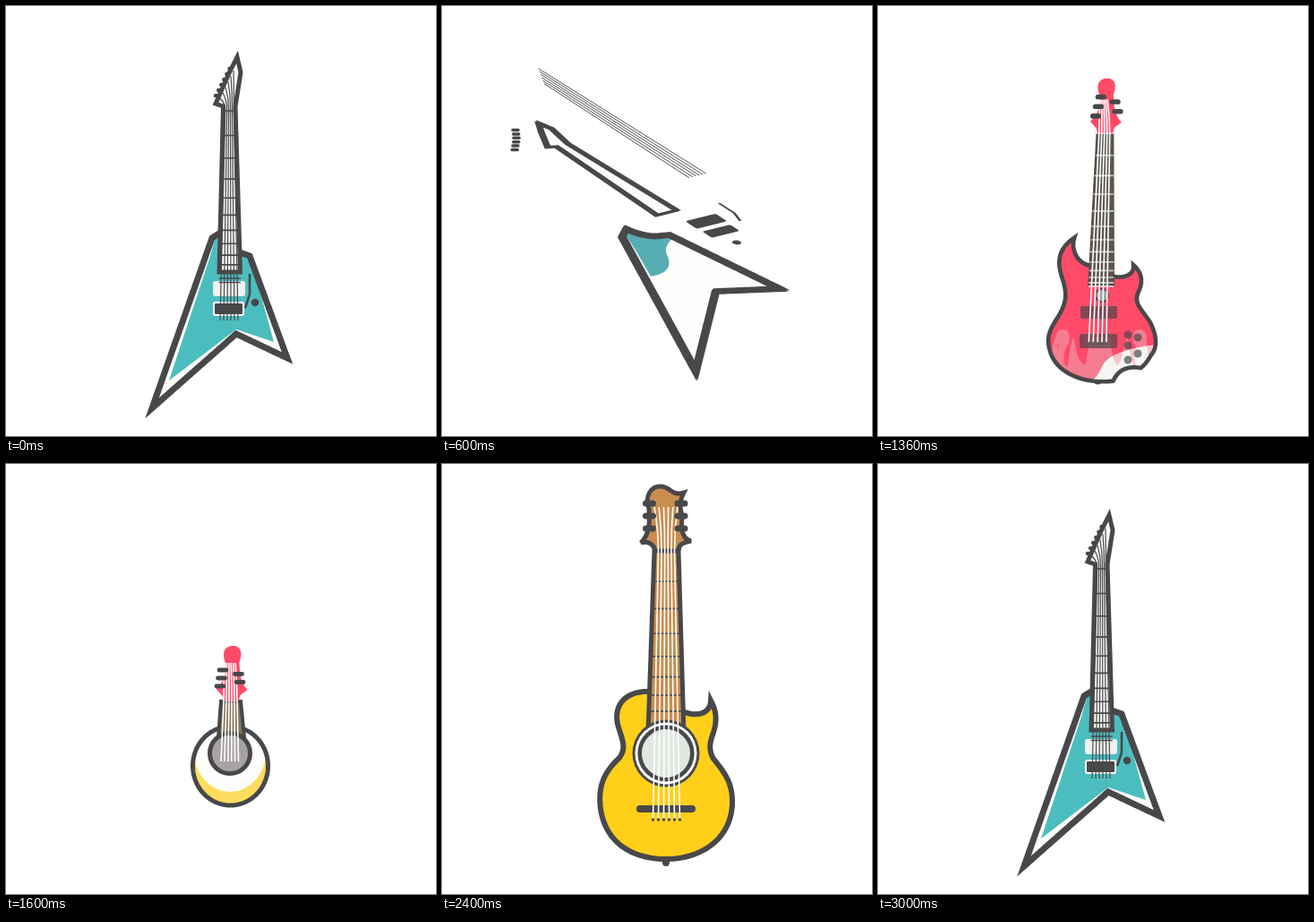
Animation of 480x480 px, one loop 3280 ms. Source, as an HTML page:

```html
<!DOCTYPE html>
<html lang="en">
<head>
<meta charset="utf-8">
<title>Morphing guitars</title>
<style>
html, body { margin: 0; width: 100%; height: 100%; overflow: hidden; background: #fff; }
svg { display: block; width: 100vw; height: 100vh; }
</style>
</head>
<body>
<svg id="stage" viewBox="0 0 480 480"></svg>
<script>
const NS = 'http://www.w3.org/2000/svg';
const stage = document.getElementById('stage');
const DARK = '#48484a', PALE = '#e3eae4', RED = '#ff4a68', YELLOW = '#ffcf1a', WOOD = '#c98d4f', BLANK = '#fdfdfb';
const LOOP = 3280, STEP = 40, END = 3000;

// Blends numbers, arrays and objects alike.
function mix(a, b, u) {
  if (Array.isArray(a)) return a.map((v, i) => mix(v, b[i], u));
  if (typeof a === 'object') return Object.fromEntries(Object.keys(a).map(k => [k, mix(a[k], b[k], u)]));
  return a + (b - a) * u;
}

// Eased value at time t from [time, value] keys.
function at(t, keys) {
  const i = keys.findIndex(k => k[0] > t);
  if (i < 0) return keys[keys.length - 1][1];
  if (!i) return keys[0][1];
  const [t0, a] = keys[i - 1], [t1, b] = keys[i], u = (t - t0) / (t1 - t0);
  return mix(a, b, u * u * (3 - 2 * u));
}

// Evenly spaced outline points, snapped to the path's own corners.
function outline(d, n = 180) {
  const path = document.createElementNS(NS, 'path');
  path.setAttribute('d', d);
  const len = path.getTotalLength();
  const pts = Array.from({ length: n }, (_, i) => {
    const p = path.getPointAtLength(len * i / n);
    return [p.x, p.y];
  });
  for (const seg of d.match(/[MLCA][^MLCAZ]+/g)) {
    const c = seg.match(/[\d.]+/g).slice(-2).map(Number);
    const far = p => Math.hypot(p[0] - c[0], p[1] - c[1]);
    let best = 0;
    pts.forEach((p, i) => { if (far(p) < far(pts[best])) best = i; });
    pts[best] = c;
  }
  return pts;
}

// Six tuning pegs as [x, y, length, thickness], usually in two columns.
const six = f => Array.from({ length: 6 }, (_, i) => f(i));
const columns = (left, right, top, gap, lean, len, w, stagger = 0) => six(i => {
  const row = i >> 1, side = i % 2;
  return [side ? right + lean * row : left - lean * row, top + gap * row + stagger * side, len, w];
});
const loosePegs = six(i => [82 + Math.sin(i * .8), 138.5 + 4.4 * i, 6, 3.5]);

// neck: top left x, y, top right x, bottom left x, y, bottom right x
// strings: first x, gap, y at head, nut and bridge; frets: start, span, overhang, opacity
const vee = {
  body: outline('M241 252L230 259L163 449L257 366L314 393L272 279L261 275C252 271 245 262 241 252Z'), rim: 7,
  neck: [242.5, 112, 256, 238, 297, 261.5], edge: 5, wood: [244, 244, 240],
  strings: [[239, 3, 103], [244.8, 1.9, 115], [239, 4, 351]], rake: -6.2, bulge: 0, ink: 74,
  frets: [117, 190, 0, 1], hole: [0, 0], tone: [223, 232, 225], blank: [110, 140], pin: [245, 330],
  pegs: six(i => [250 - 3.1 * i, 70 + 6 * i, 1, 4.5]), w: { vee: 1, bass: 0, folk: 0, oct: 0 }
};
const bass = {
  body: outline('M237 289C214 288 206 262 217 238C193 254 194 272 203 292C214 316 211 328 197 345C182 362 174 372 178 392C183 424 222 440 262 437C266 420 282 414 299 421C305 417 309 411 313 404C323 394 321 376 308 358C296 343 282 335 291 320C302 304 299 291 288 282C292 296 282 308 262 305Z'), rim: 4.5,
  neck: [246, 86, 263, 234, 315, 262], edge: 0, wood: [72, 72, 74],
  strings: [[250, 1.8, 50], [248.5, 3, 86], [233, 5.4, 397]], rake: 0, bulge: 0, ink: 255,
  frets: [85.5, 229, 0, 1], hole: [0, 0], tone: [168, 162, 164], blank: [44, 54], pin: [243, 441],
  pegs: columns(252, 267, 42, 11.5, 3.5, 6, 6, 6), w: { vee: 0, bass: 1, folk: 0, oct: 0 }
};
const round = {
  body: outline('M250.5 293A42 44 0 0 0 250.5 381A42 44 0 0 0 250.5 293Z'), rim: 5,
  neck: [240, 265, 262, 237, 305, 266], edge: 4, wood: [138, 115, 88],
  strings: [[244, 2.4, 222], [243, 3, 265], [240, 3.9, 332]], rake: 0, bulge: 0, ink: 255,
  frets: [265, 40, 0, 0], hole: [22.5, 5], tone: [168, 162, 164], blank: [40, 44], pin: [250, 370],
  pegs: columns(242, 259.5, 230, 9, 1.5, 8, 4.8, 4.5), w: { vee: 0, bass: 0, folk: 0, oct: 0 }
};
const folk = {
  body: outline('M232 254C203 253 190 271 197 294C203 312 205 318 198 328C180 345 174 360 177 385C183 425 215 441 250 441C288 441 322 420 324 380C325 355 314 343 303 329C295 315 302 305 304 296C307 285 306 275 300 264C300 277 287 283 271 277Z'), rim: 6,
  neck: [237, 97, 264, 230, 301, 270], edge: 5, wood: [201, 141, 79],
  strings: [[237, 5.2, 48], [241.5, 3.6, 98], [235.5, 6, 397]], rake: 0, bulge: 0, ink: 255,
  frets: [98, 228, 0, 1], hole: [29.3, 4.6], tone: [223, 232, 225], blank: [0, 0], pin: [250, 445],
  pegs: columns(231.5, 267, 44, 14, 0, 8, 7), w: { vee: 0, bass: 0, folk: 1, oct: 0 }
};
const oct = {
  body: outline('M246 254L208 267L178 333L207 367L256 382L293 367L316 333L288 275Z'), rim: 6,
  neck: [241.5, 23, 255.5, 241.5, 286, 258.5], edge: 5, wood: [220, 161, 102],
  strings: [[246.5, 1.2, 43], [246, 1.4, 85], [242, 3.2, 337]], rake: 0, bulge: 15, ink: 74,
  frets: [50, 240, 9, 1], hole: [37, 5], tone: [223, 232, 225], blank: [110, 140], pin: [250, 370],
  pegs: columns(226, 265, 36, 12.5, .5, 1.5, 6.5, 4), w: { vee: 0, bass: 0, folk: 0, oct: 1 }
};
const stretched = { ...vee, body: mix(oct.body, vee.body, 1.14) };

const FORMS = [
  [620, vee], [760, bass], [1240, bass], [1560, round], [1600, round], [1840, folk],
  [2420, folk], [2660, oct], [2680, oct], [2800, stretched], [2920, vee]
];
const TILT = [[80, 0], [500, .96], [600, 1], [680, 1.12], [880, -.04], [960, 0]];

// Exploded view: pivot, where it lands, then length and direction of the axes.
const POSE = {
  body: [235, 256, 204, 253, 1, 48.6, -22],
  neck: [250, 300, 254, 231.5, .75],
  strings: [249, 351, 285.5, 189.5, .78],
  pickups: [249, 315, 294.5, 240],
  lever: [272, 299, 309, 220],
  knob: [278, 331, 329, 264]
};
function pose(name, k, inner, drop = 0) {
  const [px, py, qx, qy, size = .9, lean = 57, slant = -14] = POSE[name];
  const rad = Math.PI / 180 * k, u = mix(1, .97, k), v = mix(1, size, k);
  const a = u * Math.cos(slant * rad), b = u * Math.sin(slant * rad);
  const c = v * Math.sin(lean * rad), d = v * Math.cos(lean * rad);
  const e = mix(px, qx, k) - a * px - c * py, f = mix(py, qy, k) - b * px - d * py + drop;
  return `<g transform="matrix(${[a, b, c, d, e, f]})">${inner}</g>`;
}

const shape = (d, fill, more = '') => `<path d="${d}" fill="${fill}" ${more}/>`;
const line = (d, color, w, more = '') => shape(d, 'none', `stroke="${color}" stroke-width="${w}" ${more}`);
const dot = (x, y, r, fill, more = '') => `<circle cx="${x}" cy="${y}" r="${r}" fill="${fill}" ${more}/>`;
const box = (x, y, w, h, r, fill, more = '') => `<rect x="${x}" y="${y}" width="${w}" height="${h}" rx="${r}" fill="${fill}" ${more}/>`;
const group = (alpha, inner) => alpha > .01 ? `<g opacity="${alpha}">${inner}</g>` : '';
const move = (x, y, inner) => `<g transform="translate(${x} ${y})">${inner}</g>`;
const edge = w => `stroke="${DARK}" stroke-width="${w}"`;
const rgb = c => `rgb(${c.map(Math.round)})`;
const wave = y => `M100 100H400V${y - 40}Q262 ${y - 42} 250 ${y - 12}T206 ${y + 3}T100 ${y}Z`;
const fretAt = i => i * (.15 - .0055 * i);

// Outline that looks thicker on its left side when tilted.
function rim(d, w, k) {
  const stroke = line(d, DARK, w, 'stroke-miterlimit="10"');
  return stroke + (k > .05 ? move(-2.5 * k, k, stroke) : '');
}

const BASS_HEAD = 'M246 86L245 80L238 72C246 66 250 55 249 44C243 30 249 24 257 24C266 24 268 32 264 42C264 55 266 66 273 73L265 79L263 86Z';
const FOLK_HEAD = 'M238 97C236 88 228 86 222 88C232 78 232 66 231 50C226 36 233 24 245 25C256 26 256 36 270 32C264 44 266 48 268 60C266 76 270 84 278 86C268 88 264 90 264 97';
const VEE_NECK = 'M258 57L262 74L256 112L261.5 297H238L242.5 112L234 109L249 75Z';

// Pale lower body with red tongues licking down, mirrored left and right.
function flames() {
  let tongues = '', drops = '';
  for (const s of [-1, 1]) {
    for (let j = 0; j < 3; j++) {
      const x = 249 + s * (60 - 20 * j), tip = 405 - 2 * j;
      tongues += `M${x - 11} 364C${x - 8} 384 ${x - 7} 396 ${x - 2 * s} ${tip}C${x + 5} 396 ${x + 3} 384 ${x + 11} 364Z`;
    }
    const x = 249 + s * 43;
    drops += `M${x} 361C${x + 11} 361 ${x + 9} 377 ${x + 3} 383Q${x} 391 ${x + 3} 402H${x - 4}Q${x - 8} 388 ${x - 4} 380C${x - 10} 372 ${x - 8} 361 ${x} 361Z`;
  }
  return box(150, 370, 200, 90, 0, PALE) + shape(tongues, RED) + shape(drops, PALE);
}

function bodyFill(t, { w, blank }) {
  if (t < 700 || t > 2680) {
    const full = t < 700 ? at(t, [[400, 1], [600, .29], [680, 0]]) : w.vee;
    return `<clipPath id="level"><path d="${wave(mix(240, 490, full))}"/></clipPath>` +
      shape('M234 258L227 282L182 418L257 361L299 375L273 281L262 268Z',
        rgb(mix([92, 166, 176], [76, 189, 190], full)), 'clip-path="url(#level)"');
  }
  if (t < 1540) return shape(wave(mix(230, 500, w.bass)), RED) + group(w.bass ** 3, flames());
  return group(.7 + .3 * w.folk, box(150, 230, 200, 230, 0, YELLOW)) +
    `<ellipse cx="250" cy="322" rx="${blank[0]}" ry="${blank[1]}" fill="${BLANK}"/>`;
}

function bodyPart(t, k, g) {
  const d = `M${g.body.join('L')}Z`;
  return pose('body', k, `<clipPath id="inside"><path d="${d}"/></clipPath>` +
    dot(...g.pin, 4, DARK) + shape(d, BLANK) +
    `<g clip-path="url(#inside)">${bodyFill(t, g)}</g>` + rim(d, g.rim, k), 24 * Math.sin(Math.PI * k));
}

function fittings(t, k, { w }) {
  const flat = Math.max(0, 1 - 2.5 * k);
  if (t < 680 || t > 2680) return group(t < 680 ? 1 : w.vee,
    pose('pickups', k, box(231, 307, 36, 17, 3, flat > .5 ? '#eef2ee' : DARK) +
      box(232, 331, 33, 14, 2, DARK, `stroke="#fff" stroke-width="${2 * flat}"`)) +
    pose('lever', k, line('M272 299V322L267 337', DARK, 2.6)) + pose('knob', k, dot(278, 331, 4.3, DARK)));
  const knob = (x, y) => dot(x, y, 4.5, DARK);
  return group(t < 760 ? 1 : w.bass,
    pose('pickups', k, box(226, 335, 41, 14, 2, DARK) + box(225, 366, 42, 16, 2, DARK)) +
    pose('knob', k, knob(279, 367) + knob(279, 379) +
      group(at(t, [[860, 0], [1040, 1]]), knob(290, 370) + knob(290, 388) + knob(279, 395))));
}

function neckPart(t, k, { neck, frets, w, ...g }) {
  const [tl, yt, tr, bl, yb, br] = neck, [start, span, over, alpha] = frets;
  const isVee = t < 680 || t > 2780, isBass = !isVee && t < 1400, mid = (tl + tr) / 2;
  let bars = '';
  for (let i = over > 5 ? 1 : 0; i < (isVee || isBass ? 13 : 8); i++) {
    const y = start + span * fretAt(i), u = (y - yt) / (yb - yt);
    bars += `M${mix(tl, bl, u) - over} ${y}H${mix(tr, br, u) + over}`;
  }
  const wood = shape(`M${tl} ${yt}H${tr}L${br} ${yb}H${bl}Z`, rgb(g.wood), edge(g.edge));
  const neckShape = isVee ? shape(VEE_NECK, '#fbfbf8') + rim(VEE_NECK, 5, k)
    : t < 1720 ? wood + move(mid - 254.5, yt - 86, shape(BASS_HEAD, RED))
    : group(1 - w.oct - w.vee, move(mid - 250.5, yt - 97, shape(FOLK_HEAD, WOOD, edge(5)))) + wood;
  const shown = t < 680 ? Math.max(0, 1 - 2.5 * k) : 1;
  return pose('neck', k, neckShape + group(alpha * shown, line(bars, isBass ? '#fff' : DARK, 1.6)));
}

function holePart({ hole: [r, width], tone, w }) {
  return (r > .5 ? group(w.folk, dot(250, 323, 37.5, DARK) + dot(250, 323, 34.5, '#fff')) +
      dot(250, 323, r, rgb(tone), edge(width)) : '') +
    group(w.folk, line('M221 385H279', DARK, 8, 'stroke-linecap="round"')) +
    group(w.oct, line('M228 264H274', DARK, 3.5) + dot(291, 353, 2, DARK));
}

function stringPart(t, k, { strings, rake, bulge, ink, w }) {
  const isBass = t >= 680 && t < 1400;
  let d = '', ends = '';
  for (let i = 0; i < (isBass ? 5 : 6); i++) {
    const [head, nut, foot] = strings.map(([x, gap, y]) => [x + gap * i, y]);
    head[1] += rake * i;
    foot[1] += bulge * Math.sin(Math.PI * i / 5);
    const along = (nut[1] - head[1]) / (foot[1] - head[1]);
    const bend = mix(nut, mix(head, foot, along), Math.min(1, Math.max(0, k)));
    d += `M${head}Q${bend[0]} ${mix(head[1], bend[1], .5)} ${bend}L${foot}`;
    ends += dot(...foot, 1.7, DARK);
  }
  return pose('strings', k, line(d, rgb([ink, ink, ink]), ink > 160 ? 1.6 : 1.2) + group(w.bass + w.folk, ends));
}

function pegPart(t, k, { pegs }) {
  const count = t >= 680 && t < 1720 ? 5 : 6;
  return mix(pegs, loosePegs, Math.min(1, k)).slice(0, count).map(([x, y, len, w]) =>
    line(`M${x - len / 2} ${y}h${len}`, DARK, w, 'stroke-linecap="round"')).join('');
}

function draw(now) {
  const t = Math.min(END, Math.floor(now % LOOP / STEP) * STEP);
  const k = at(t, TILT), g = at(t, FORMS);
  stage.innerHTML = bodyPart(t, k, g) + fittings(t, k, g) + neckPart(t, k, g) +
    holePart(g) + stringPart(t, k, g) + pegPart(t, k, g);
}

const start = performance.now();
function tick() {
  draw(performance.now() - start);
  requestAnimationFrame(tick);
}
tick();
</script>
</body>
</html>
```
